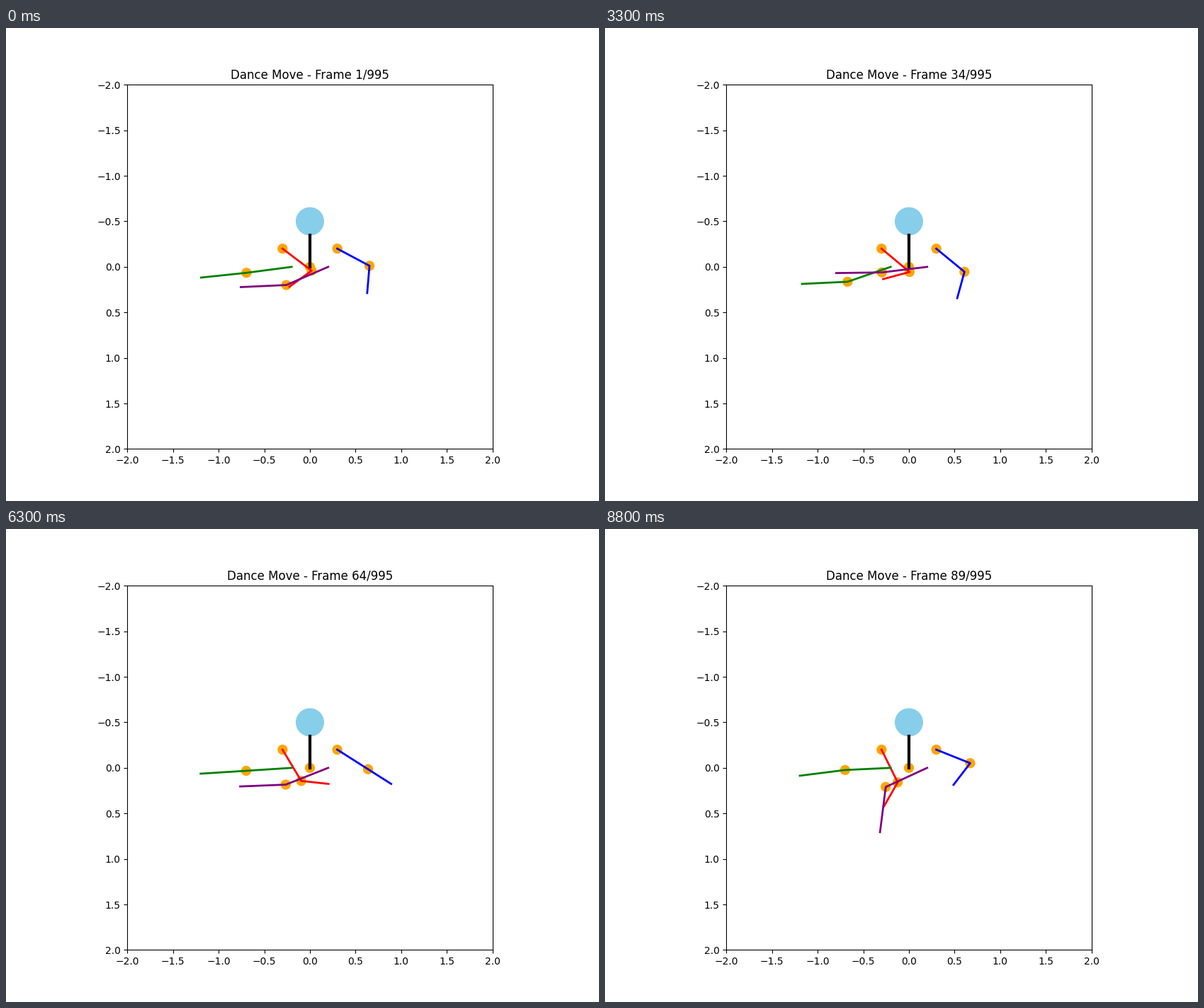
These frames come from a looping animation (837x669 px, 8.9 s). A matplotlib script:

```python
import numpy as np
import matplotlib.pyplot as plt
from matplotlib.animation import FuncAnimation
from matplotlib.patches import Circle

N = 89
TOTAL = 995
KEYS = [0, 16, 33, 51, 63, 72, 88]
UPPER_ARM, FOREARM, THIGH, SHIN = 0.4, 0.3, 0.5, 0.5


def slopes(t, v):
    """Tangents that keep each eased segment free of overshoot."""
    h, d = np.diff(t), np.diff(v) / np.diff(t)
    m = np.zeros(len(v))
    for k in range(1, len(v) - 1):
        if d[k - 1] * d[k] > 0:
            w1, w2 = 2 * h[k] + h[k - 1], h[k] + 2 * h[k - 1]
            m[k] = (w1 + w2) / (w1 / d[k - 1] + w2 / d[k])
    m[0], m[-1] = d[0], d[-1]
    return m


def track(angles, extra=()):
    """Angle in radians for every frame, eased through the key poses."""
    t, v = np.array(sorted([*zip(KEYS, angles), *extra]), float).T
    m = slopes(t, v)
    x = np.arange(N)
    k = np.clip(np.searchsorted(t, x, side="right") - 1, 0, len(t) - 2)
    h = t[k + 1] - t[k]
    s = (x - t[k]) / h
    y = ((1 + 2 * s) * (1 - s) ** 2 * v[k] + s * (1 - s) ** 2 * h * m[k]
         + s * s * (3 - 2 * s) * v[k + 1] + s * s * (s - 1) * h * m[k + 1])
    return np.radians(y)


def step(point, length, angle):
    return point[0] + length * np.cos(angle), point[1] + length * np.sin(angle)


class Limb:
    def __init__(self, ax, color, root, lengths, upper, lower):
        self.root, self.lengths = root, lengths
        self.upper, self.lower = upper, lower
        self.line, = ax.plot([], [], color=color, lw=2)
        self.joint = ax.add_patch(Circle(root, 0.05, color="orange"))

    def pose(self, i):
        mid = step(self.root, self.lengths[0], self.upper[i])
        end = step(mid, self.lengths[1], self.lower[i])
        self.line.set_data(*zip(self.root, mid, end))
        self.joint.center = mid


# The tiny surplus keeps the pixel size from rounding down.
fig, ax = plt.subplots(figsize=(8.37001, 6.69001), dpi=100)
ax.set_aspect("equal")
ax.set_xlim(-2, 2)
ax.set_ylim(2, -2)
title = ax.set_title("")

ax.add_patch(Circle((0, -0.5), 0.15, color="skyblue"))
for spot in [(-0.3, -0.2), (0.3, -0.2), (0, 0)]:
    ax.add_patch(Circle(spot, 0.05, color="orange"))
ax.plot([0, 0], [-0.35, 0], color="black", lw=3)

arm, leg = (UPPER_ARM, FOREARM), (THIGH, SHIN)
limbs = [
    Limb(ax, "red", (-0.3, -0.2), arm,
         track([37.2, 30, 39.8, 90.6, 59.2, 24.2, 63.8]),
         track([144, 168.3, 164.9, 13.3, 6.2, 76.5, 119.6])),
    Limb(ax, "blue", (0.3, -0.2), arm,
         track([28.1, 58.6, 39.5, 80.4, 32.5, 10.5, 21.8],
               [(22, 60), (60, 33), (69, 13)]),
         track([94.8, 52.3, 105.3, 23.3, 32.5, 28.7, 127.5],
               [(22, 80), (60, 16), (69, 21)])),
    Limb(ax, "green", (-0.2, 0), leg,
         track([172.5, 169.8, 160.9, 176.1, 176.3, 139, 177.3], [(77, 129)]),
         track([174, 171, 177.3, 166, 176.4, 116.1, 172.8], [(77, 92)])),
    Limb(ax, "purple", (0.2, 0), leg,
         track([156.5, 163.7, 173, 149.1, 158.4, 140.9, 155.2],
               [(41, 143), (45, 148.5)]),
         track([177.4, 176.6, 179.2, 153.6, 177.7, 135, 97.2],
               [(41, 150), (45, 153), (54, 160)])),
]


def draw(i):
    for limb in limbs:
        limb.pose(i)
    title.set_text(f"Dance Move - Frame {i + 1}/{TOTAL}")
    return []


anim = FuncAnimation(fig, draw, frames=N, interval=100, repeat=True,
                     repeat_delay=0, init_func=lambda: draw(0))
plt.show()
```
